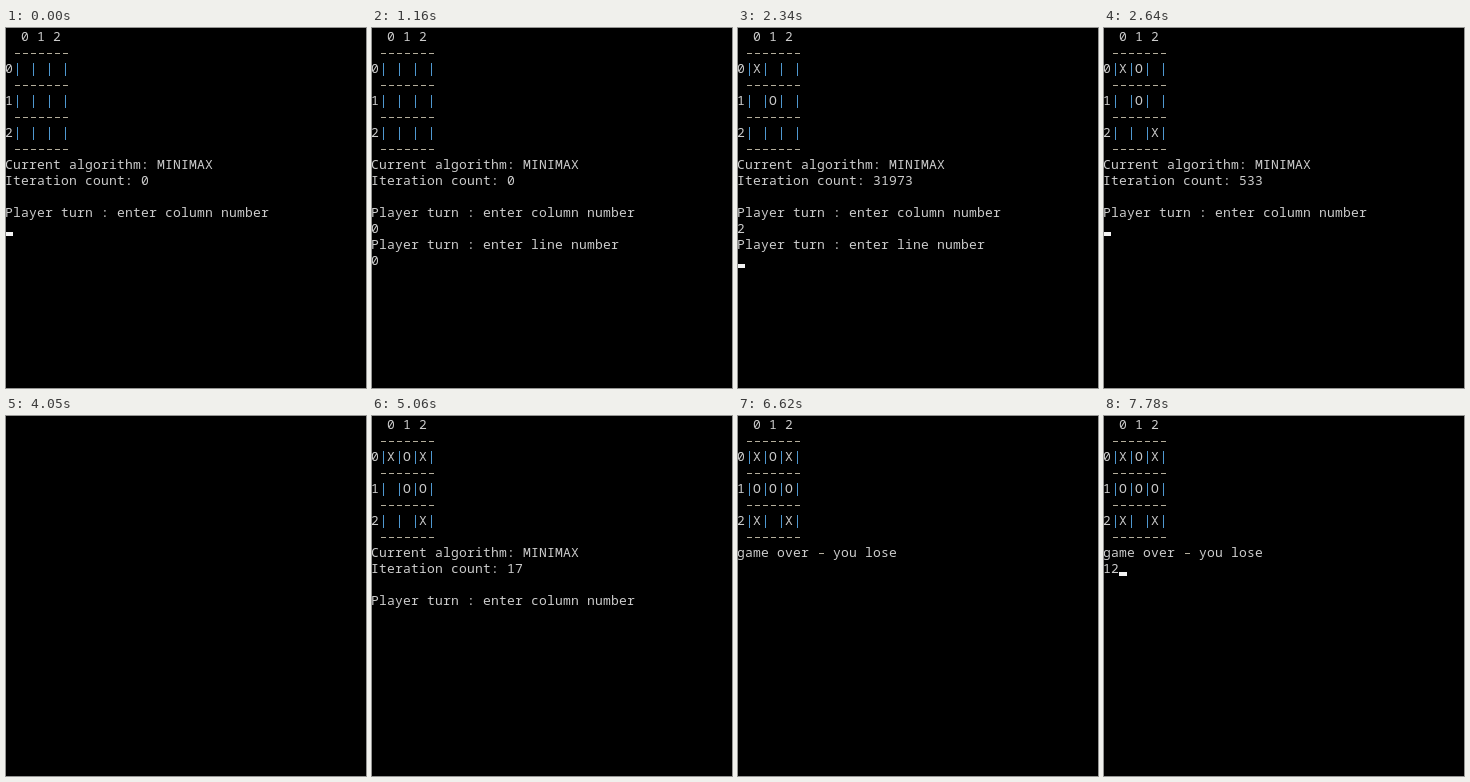
An HTML page with a canvas for the animation above (7.86 s loop, 360x360 px).

```html
<!DOCTYPE html>
<html>
<head>
<meta charset="utf-8">
<style>
html, body { margin: 0; width: 100%; height: 100%; overflow: hidden; background: #000; }
canvas { display: block; }
</style>
</head>
<body>
<canvas id="stage" width="360" height="360"></canvas>
<script>
const ctx = document.getElementById('stage').getContext('2d');
const LOOP = 7860, CELL_W = 8, CELL_H = 16, LEFT = -1;
const INK = '#cccccc', BAR = '#4f98d0', DASH = '#b4ae9c', CURSOR = '#f2f2f2';
const PROMPT = 'Player turn : enter ';

function boardLines(cells) {
  const rule = ' -------';
  const lines = ['  0 1 2', rule];
  for (let r = 0; r < 3; r++) {
    lines.push(r + '|' + [...cells.slice(r * 3, r * 3 + 3)].join('|') + '|', rule);
  }
  return lines;
}

const status = (cells, count) =>
  [...boardLines(cells), 'Current algorithm: MINIMAX', 'Iteration count: ' + count];

const askColumn = (cells, count) =>
  [...status(cells, count), '', PROMPT + 'column number'];

const askLine = (cells, count, column, line = '') =>
  [...askColumn(cells, count), column, PROMPT + 'line number', line];

const gameOver = typed => [...boardLines('XOXOOOX X'), 'game over - you lose', typed];

// Screen states: start time, lines, cursor [column, row] when lit.
const screens = [];
const show = (time, lines, cursor) => screens.push({ time, lines, cursor });

const START = ' '.repeat(9);
const TURN2 = 'X   O    ', TURN3 = 'XO  O   X', TURN4 = 'XOX OO  X';
const colInput = [0, 12], lineTyped = [1, 14];

show(0, askColumn(START, 0), colInput);
show(860, askColumn(START, 0));
show(1010, askLine(START, 0, '0'));
show(1160, askLine(START, 0, '0', '0'));
show(1240, []);
show(1320, status('X        ', 0), [0, 10]);
show(1390, askColumn(TURN2, 31973), colInput);
show(2340, askLine(TURN2, 31973, '2'), [0, 14]);
show(2570, [], lineTyped);
show(2640, askColumn(TURN3, 533), colInput);
show(3500, askColumn(TURN3, 533));
show(3820, askLine(TURN3, 533, '2'));
show(4050, []);
show(4120, status('XOX O   X', 533), [0, 10]);
show(4200, askColumn(TURN4, 17), colInput);
show(5060, askColumn(TURN4, 17));
show(5610, askColumn(TURN4, 17), colInput);
show(5760, askLine(TURN4, 17, '0'), [0, 14]);
show(5990, [], lineTyped);
show(6070, gameOver(''), [0, 9]);
show(6620, gameOver(''));
show(7150, gameOver(''), [0, 9]);
show(7380, gameOver('1'), [1, 9]);
show(7780, gameOver('12'), [2, 9]);

function fill(color, x, y, w, h) {
  ctx.fillStyle = color;
  ctx.fillRect(x, y, w, h);
}

function drawChar(ch, col, row) {
  const x = LEFT + col * CELL_W, y = row * CELL_H;
  if (ch === '|') {
    fill(BAR, x + 4, y + 3, 1, 13);
  } else if (ch === '-') {
    fill(DASH, x + 2, y + 9, 5, 1);
  } else if (ch !== ' ') {
    ctx.fillStyle = INK;
    ctx.fillText(ch, x + CELL_W / 2, y + 13);
  }
}

function draw({ lines, cursor }) {
  fill('#000', 0, 0, 360, 360);
  ctx.font = '13px "Noto Sans Mono", "DejaVu Sans Mono", monospace';
  ctx.textAlign = 'center';
  lines.forEach((line, row) => [...line].forEach((ch, col) => drawChar(ch, col, row)));
  if (cursor) {
    fill(CURSOR, LEFT + cursor[0] * CELL_W, cursor[1] * CELL_H + 12, CELL_W, 4);
  }
}

const origin = performance.now();
function tick() {
  const t = (performance.now() - origin) % LOOP;
  draw(screens.findLast(s => s.time <= t) || screens[0]);
  requestAnimationFrame(tick);
}
tick();
</script>
</body>
</html>
```
